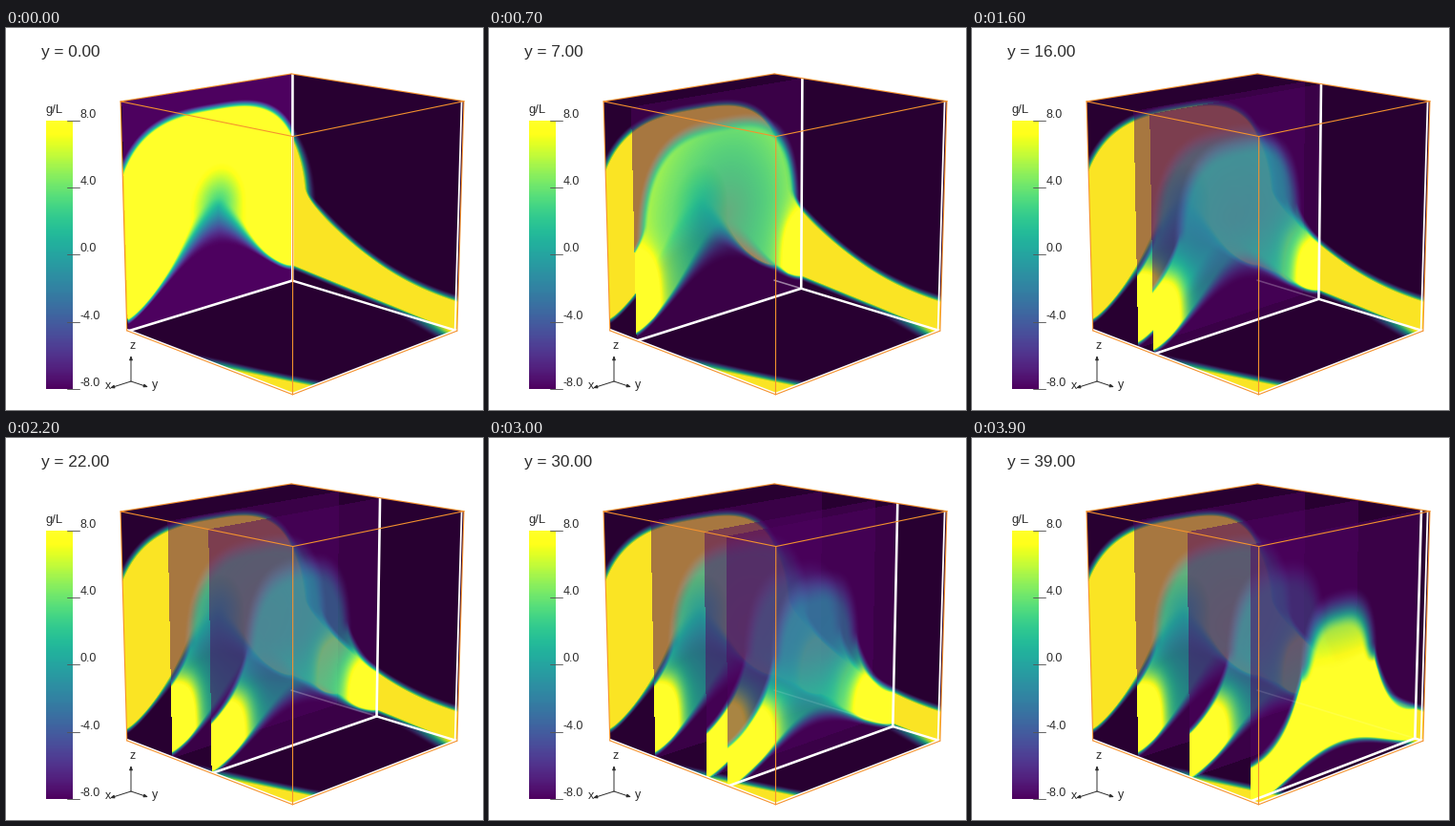
Animation of 500 by 400 pixels, one loop 4000 ms. Source, as a matplotlib script:

```python
import numpy as np
import matplotlib.pyplot as plt
from matplotlib.animation import FuncAnimation
from matplotlib.colors import ListedColormap

W, H, STEPS = 500, 400, 40
ORANGE = "#f5922e"
INK = "#2c2c2c"
KEPT = (12, 25)          # slices that stay behind once passed
plt.rcParams["font.family"] = "Liberation Sans"

# Slightly overexposed viridis for slices and colour bar
BRIGHT = ListedColormap(
    np.clip(plt.cm.viridis(np.linspace(0, 1, 256))[:, :3] * 1.14, 0, 1))

# Box corners (u, t, z) and where they fall on the stage
CORNERS = {
    (0, 0, 0): (127, 318), (1, 0, 0): (299, 263),
    (0, 1, 0): (300, 383), (1, 1, 0): (473, 318),
    (0, 0, 1): (120, 77), (1, 0, 1): (299, 48),
    (0, 1, 1): (301, 113), (1, 1, 1): (480, 77),
}


def fit_camera():
    rows = []
    for point, (px, py) in CORNERS.items():
        p = np.array([*point, 1.0])
        rows.append(np.r_[p, np.zeros(4), -px / W * p])
        rows.append(np.r_[np.zeros(4), p, -py / W * p])
    cam = np.linalg.svd(np.array(rows))[2][-1].reshape(3, 4)
    return np.diag([W, W, 1]) @ cam


CAM = fit_camera()
PX, PY = np.meshgrid(np.arange(W) + 0.5, np.arange(H) + 0.5)
PIXELS = np.stack([PX.ravel(), PY.ravel(), np.ones(W * H)])


def project(u, t, z):
    x, y, w = CAM @ np.array([u, t, z, 1.0])
    return x / w, y / w


def depth(k):
    """Place of slice k between the back (0) and the front (1)."""
    return 0.008 + 0.0243 * k


def sigmoid(x):
    return 0.5 * (1 + np.tanh(x / 2))


def smooth(x):
    x = np.clip(x, 0, 1)
    return x * x * (3 - 2 * x)


def shell(u, t, z):
    """1 inside the plume, 0 outside: a domed column on a flared skirt."""
    d = np.abs(u - 0.5)
    r = d / (0.24 + 0.35 * (1 - t) ** 1.7)
    rise = np.maximum(z - 0.3, 0) / (0.625 - 0.18 * t)
    rho = np.cbrt(r ** 3 + rise ** 3)
    column = smooth((1.01 - rho) / (0.08 + 0.32 * t))
    skirt = 0.13 + 0.27 * np.exp(-(np.maximum(r, 0.9) - 1.05) / 0.5)
    flare = smooth((skirt - z) / (0.05 + 0.12 * t * (1 - 2 * d)))
    return 1 - (1 - column) * (1 - flare)


def lift(u, t, z):
    """1 above the plume's lower surface, 0 below it."""
    hump = (0.23 - 0.115 * t) * np.sin(np.pi * np.clip(u, 0, 1)) ** 1.4
    low = 0.06 - 0.085 * t + 0.025 * (u - 0.5) + hump
    blur = 0.04 + 0.2 * np.cos(np.pi * (u - 0.5)) ** 4 * (1 - t)
    return smooth((z - low + 0.02) / blur)


def field(u, t, z):
    """Concentration inside the box, from -8 to 8."""
    d = np.abs(u - 0.5)
    hollow = np.hypot((u - 0.53) / 0.17, np.maximum(z - 0.45, 0) / 0.2)
    body = -2.6 + 4.5 * t * smooth((0.5 - z) / 0.35)
    body = body + (4.6 + 6 * hollow) * np.exp(-(t / 0.18) ** 1.4)
    legs = sigmoid((d - 0.46 + 0.29 * t) / (0.025 + 0.035 * t))
    body = body + 14 * legs * sigmoid((0.32 - z) / 0.05)
    front = np.exp(-((1 - t) / 0.09) ** 1.3)
    body = body + front * (15 - 20 * np.maximum(z - 0.45, 0))
    mask = shell(u, t, z) * lift(u, t, z)
    return np.clip(-8 + (np.minimum(body, 12) + 8) * mask, -8, 8)


def plane(axis, value):
    """Pixels covered by one box plane, with the level 0..1 at each."""
    free = [i for i in range(3) if i != axis]
    hom = np.stack([CAM[:, free[0]], CAM[:, free[1]],
                    CAM[:, axis] * value + CAM[:, 3]], axis=1)
    a, b, w = np.linalg.inv(hom) @ PIXELS
    a, b = a / w, b / w
    hit = np.flatnonzero((a >= 0) & (a <= 1) & (b >= 0) & (b <= 1))
    coords = [None] * 3
    coords[free[0]], coords[free[1]] = a[hit], b[hit]
    coords[axis] = np.full(hit.size, float(value))
    return hit, (field(*coords) + 8) / 16


def paint_walls():
    img = np.ones((W * H, 3))
    for axis, value in ((2, 0), (1, 0), (0, 1)):
        hit, level = plane(axis, value)
        rgb = plt.cm.viridis(level)[:, :3]
        img[hit] = rgb * (0.59 + 0.4 * level ** 0.7)[:, None]
    return img


def add_slice(img, k):
    hit, level = plane(1, depth(k))
    rgb = BRIGHT(level)[:, :3]
    alpha = (0.48 + 0.52 * level)[:, None] if k else 1.0
    out = img.copy()
    out[hit] = rgb * alpha + img[hit] * (1 - alpha)
    return out


# Backgrounds with none, one or both of the kept slices
BACKS = [paint_walls()]
for kept in KEPT:
    BACKS.append(add_slice(BACKS[-1], kept))

fig = plt.figure(figsize=(5, 4), dpi=100, facecolor="white")
ax = fig.add_axes([0, 0, 1, 1])
ax.axis("off")


def label(x, y, text, px, **kw):
    return ax.text(x, y, text, fontsize=px * 0.72, color=INK, va="center", **kw)


def line(points, color, px, **kw):
    xs, ys = zip(*points)
    return ax.plot(xs, ys, color=color, lw=px * 0.72,
                   solid_capstyle="round", **kw)[0]


def edge(a, b, color, px, **kw):
    return line([project(*a), project(*b)], color, px, **kw)


def set_edge(artist, a, b):
    artist.set_data(*zip(project(*a), project(*b)))


scene = ax.imshow(np.ones((H, W, 3)), extent=(0, W, H, 0),
                  interpolation="nearest", aspect="auto")

# White frame: fixed part, then the part carried by the slice
edge((0, 0, 0), (0, 1, 0), "white", 4)
edge((0, 1, 0), (1, 1, 0), "white", 4)
edge((0.985, 1, 0), (0.985, 1, 1), "white", 1.8)
trail = edge((1, 0, 0), (1, 0, 0), "white", 1.6)
rail = edge((1, 0, 0), (1, 1, 0), "white", 2.4)
foot = edge((0, 0, 0), (1, 0, 0), "white", 2.6)
post = edge((1, 0, 0), (1, 0, 1), "white", 2.6)

for a, b in (((0, 0, 1), (1, 0, 1)), ((1, 0, 1), (1, 1, 1)),
             ((1, 1, 1), (0, 1, 1)), ((0, 1, 1), (0, 0, 1)),
             ((0, 0, 0), (0, 0, 1)), ((0, 1, 0), (0, 1, 1)),
             ((1, 1, 0), (1, 1, 1)), ((0, 0, 0), (0, 1, 0)),
             ((0, 1, 0), (1, 1, 0))):
    edge(a, b, ORANGE, 1.1)

# Colour bar
ramp = np.linspace(1, 0, 281)[:, None]
ax.imshow(ramp, cmap=BRIGHT, extent=(42, 70, 378, 97), aspect="auto",
          interpolation="nearest")
label(42, 86, "g/L", 13)
for i in range(5):
    y = 97 + 70.2 * i
    line([(64, y), (77, y)], "#555555", 0.9)
    label(78, y - 6, f"{8 - 4 * i:.1f}", 12.5)

# Axis triad
origin = (131, 370)
for tip, name, spot in (((131, 343), "z", (133, 333)),
                        ((109, 377), "x", (107, 375)),
                        ((149, 376), "y", (156, 374))):
    ax.annotate("", xy=tip, xytext=origin,
                arrowprops=dict(arrowstyle="-|>,head_width=0.1,head_length=0.25",
                                color=INK, lw=0.7, shrinkA=0, shrinkB=0))
    label(*spot, name, 12.5, ha="center")

title = label(37, 25.5, "", 17.2)
ax.set_xlim(0, W)
ax.set_ylim(H, 0)


def update(k):
    t = depth(k)
    passed = sum(k > s for s in KEPT)
    scene.set_data(np.clip(add_slice(BACKS[passed], k), 0, 1).reshape(H, W, 3))
    title.set_text(f"y = {k:.2f}")
    set_edge(trail, (1, 0, 0), (1, t, 0))
    trail.set_alpha(0.5 * 0.5 ** passed)
    set_edge(rail, (1, t, 0), (1, 1, 0))
    set_edge(foot, (0, t, 0), (1, t, 0))
    set_edge(post, (1, t, 0), (1, t, 1))
    return scene, title, trail, rail, foot, post


anim = FuncAnimation(fig, update, frames=STEPS, interval=100,
                     repeat=True, repeat_delay=0, blit=False)
plt.show()
```
